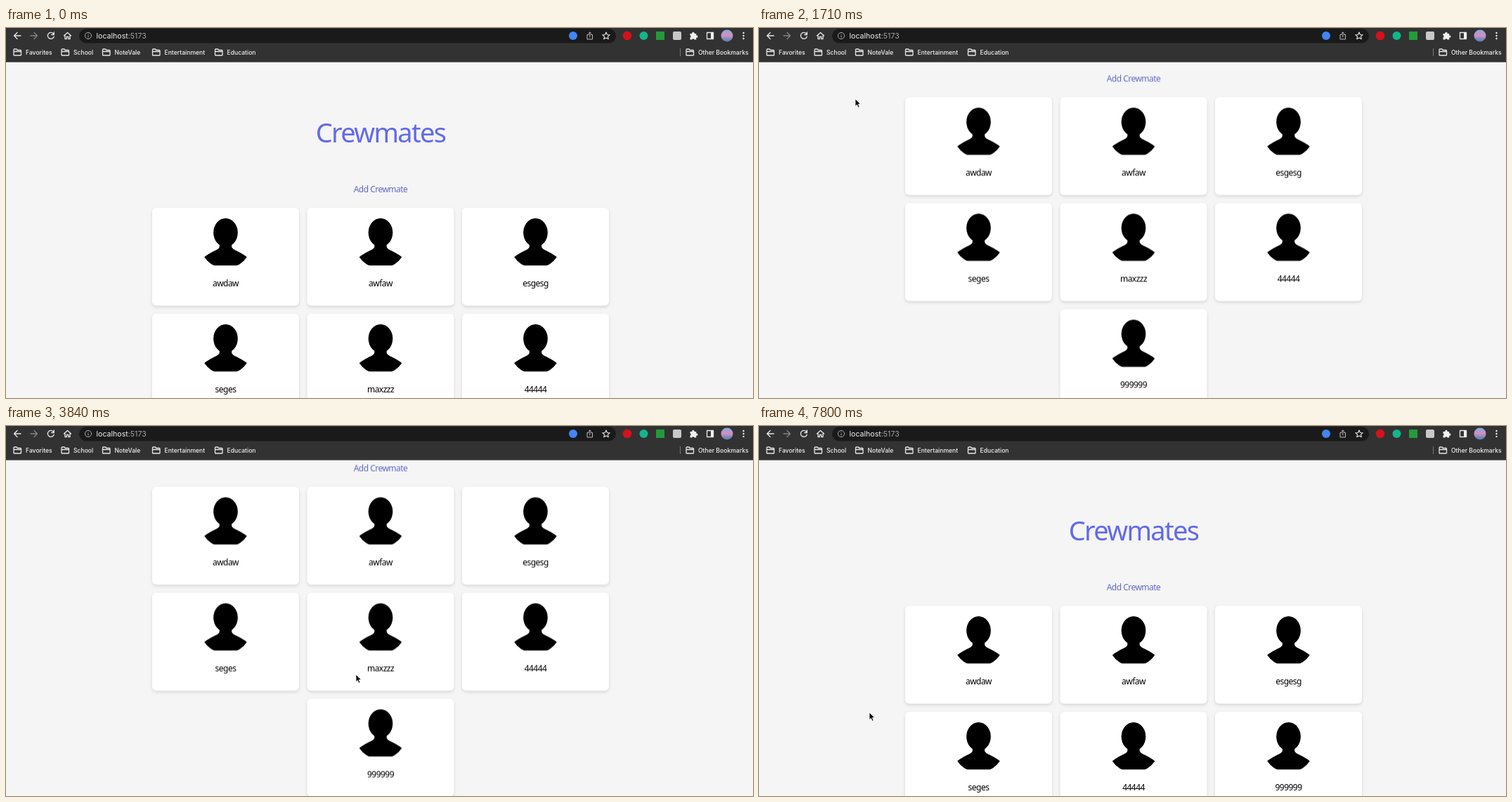
An HTML page for the animation above (8 s loop, 1063 by 527 pixels).

```html
<!DOCTYPE html>
<html lang="en">
<head>
<meta charset="utf-8">
<title>Crewmates</title>
<style>
html, body { margin: 0; width: 100%; height: 100%; overflow: hidden; background: #f5f5f5; }
svg { display: block; }
.page text { font: 12px "Noto Sans", sans-serif; letter-spacing: -.044em; text-anchor: middle; }
.page .title { font-size: 38px; fill: #626aeb; }
.page .link { fill: #6168c8; }
.page .on-dark { fill: #fff; }
.card { fill: #fff; filter: drop-shadow(0 2px 2px rgba(0, 0, 0, .13)); }
.chrome text { font: 500 8.6px Inter, sans-serif; fill: #f1f1f1; }
.chrome .url { font-size: 10.6px; font-weight: 400; }
.url .dim { fill: #a3a3a3; }
.icon { fill: none; stroke: #e8e8e8; stroke-width: 1.3; stroke-linejoin: round; stroke-linecap: round; }
.fill { fill: #f1f1f1; }

.crew, .bare, .detail, .after, .hover, .arrow, .hand { animation: 8s step-end infinite; }
.crew { animation-name: crew; }
.bare { animation-name: bare; }
.detail { animation-name: detail; }
.after { animation-name: after; }
.hover { animation-name: hover; }
.arrow { animation-name: arrow; }
.hand { animation-name: hand; }
.scroll { animation: scroll 8s linear infinite; }
.cursor { animation: cursor 8s linear infinite; }
.delete { animation: delete 8s linear infinite; }

@keyframes crew {
  0%, 13.125% { visibility: visible; }
  12.375%, 57.75%, 100% { visibility: hidden; }
}
@keyframes bare {
  0%, 13.125%, 88.5%, 100% { visibility: hidden; }
  12.375%, 86.25% { visibility: visible; }
}
@keyframes detail {
  0%, 86.25%, 100% { visibility: hidden; }
  57.75% { visibility: visible; }
}
@keyframes after {
  0% { visibility: hidden; }
  88.5%, 100% { visibility: visible; }
}
@keyframes hover {
  0%, 16.5%, 100% { visibility: hidden; }
  9.75% { visibility: visible; }
}
@keyframes arrow {
  0%, 96.75%, 100% { visibility: visible; }
  76.5% { visibility: hidden; }
}
@keyframes hand {
  0%, 96.75%, 100% { visibility: hidden; }
  76.5% { visibility: visible; }
}
@keyframes scroll {
  0%, 18.75% { transform: translateY(0); animation-timing-function: ease-in-out; }
  21.375% { transform: translateY(-157.5px); animation-timing-function: ease-out; }
  25.875% { transform: translateY(-181.5px); }
  27%, 46.2% { transform: translateY(-182.5px); }
  48%, 100% { transform: translateY(-169.5px); }
}
@keyframes cursor {
  0% { transform: translate(68px, -13px); animation-timing-function: ease-out; }
  6.375%, 9.75% { transform: translate(60px, 11px); }
  10.5%, 16% { transform: translate(60px, 12px); animation-timing-function: ease-in-out; }
  19.125%, 26% { transform: translate(137px, 101px); animation-timing-function: ease-in-out; }
  32.25% { transform: translate(421px, 393px); animation-timing-function: ease-out; }
  36% { transform: translate(494px, 418px); animation-timing-function: ease-in-out; }
  37.875%, 59% { transform: translate(498px, 354px); animation-timing-function: ease-in-out; }
  66%, 68.6% { transform: translate(519px, 460px); animation-timing-function: ease-in-out; }
  70.875%, 74.3% { transform: translate(176px, 295px); }
  75.4% { transform: translate(75px, 205px); }
  76.5% { transform: translate(140px, 457px); }
  77.25% { transform: translate(144px, 463px); animation-timing-function: ease-out; }
  81%, 96.4% { transform: translate(128px, 464px); animation-timing-function: ease-out; }
  97.5%, 100% { transform: translate(157px, 408px); }
}
@keyframes delete {
  0%, 76.4% { fill: #1a1a1a; stroke: #1a1a1a; }
  77.1%, 100% { fill: #2980b9; stroke: #5b73d8; }
}
</style>
</head>
<body>
<svg width="1063" height="527" viewBox="0 0 1063 527">
  <defs>
    <g id="person">
      <ellipse cy="30.5" rx="26" ry="30.5"/>
      <path d="M-13 48V60C-13 66 -22 68 -32 74C-44 81 -50.5 86 -50.5 93V101H50.5V93C50.5 86 44 81 32 74C22 68 13 66 13 60V48Z"/>
    </g>
    <path id="folder" class="icon" stroke-width="1" d="M.5 9V1.5Q.5 .5 1.5 .5H4.5L5.8 2H10Q11 2 11 3V9Q11 9.5 10.5 9.5H1Q.5 9.5 .5 9ZM.5 4H11"/>
    <clipPath id="round"><circle cx="104.5" cy="50" r="36.5"/></clipPath>
    <linearGradient id="photo" x2="0" y2="1">
      <stop offset=".1" stop-color="#8fa6d8"/>
      <stop offset=".5" stop-color="#d58fc0"/>
      <stop offset=".9" stop-color="#5a86b8"/>
    </linearGradient>
  </defs>

  <rect width="1063" height="527" fill="#f5f5f5"/>

  <g class="page">
    <g class="crew"><g class="scroll" id="before"></g></g>
    <g class="after" id="remaining"></g>
    <g class="bare">
      <text class="title" x="93" y="301">Crewmates</text>
      <text class="link" x="93" y="382">Add Crewmate</text>
    </g>
    <g class="detail">
      <text class="title" x="93" y="210">Crewmates</text>
      <use href="#person" x="93" y="273"/>
      <text x="93" y="409">Name: maxzzz</text>
      <text x="93" y="438">Favorite: burger</text>
      <rect x="33" y="455" width="50" height="30" rx="6" fill="#1a1a1a"/>
      <text class="on-dark" x="58" y="474.5">Edit</text>
      <rect class="delete" x="89.2" y="455.2" width="62.6" height="29.6" rx="6"/>
      <text class="on-dark" x="120.5" y="474.5">Delete</text>
    </g>
  </g>

  <g class="chrome">
    <rect width="1063" height="48.7" fill="#323232"/>
    <rect x="104" y="1" width="764" height="20.5" rx="10.2" fill="#1a1a1a"/>
    <circle class="hover" cx="64" cy="11" r="10" fill="#4a4a4a"/>
    <path class="icon" d="M21 11H11.5M16 6.5L11.5 11L16 15.500"/>
    <path class="icon" style="stroke:#858585" d="M35 11H44.500M40 6.500L44.500 11L40 15.500"/>
    <path class="icon" d="M67.300 8A4.500 4.500 0 1 0 68.200 12.200M68.300 6V9.500H64.800"/>
    <path class="icon" d="M82.500 11L87.500 6.500L92.500 11M84 10.500V15.500H86.300V12.500H88.700V15.500H91V10.500"/>
    <g class="icon" style="stroke:#a8a8a8;stroke-width:1">
      <circle cx="117" cy="11" r="4.600"/>
      <path d="M117 10.800V13.300M117 8.700V8.800"/>
    </g>
    <text class="url" x="128.500" y="15">localhost<tspan class="dim">:5173</tspan><tspan class="dim detail">/crewmate/12</tspan></text>

    <circle cx="807" cy="11" r="6" fill="#4285f4"/>
    <path class="icon" stroke-width="1" style="stroke:#bdbdbd;stroke-width:1" d="M829 9.500H827V16H834.500V9.500H832.500M830.750 13V6.200M828.700 8L830.750 6L832.800 8"/>
    <path class="icon" style="stroke-width:1.100" d="M854 6L855.500 9.500L859.200 9.800L856.400 12.200L857.300 15.800L854 13.900L850.700 15.800L851.600 12.200L848.800 9.800L852.500 9.500Z"/>
    <circle cx="884" cy="11" r="6.300" fill="#d4121b"/>
    <circle cx="907.500" cy="11" r="6" fill="#15b58c"/>
    <rect x="925" y="5" width="12" height="12" fill="#239a3b"/>
    <rect x="949" y="5" width="12" height="12" rx="2" fill="#c8c8c8"/>
    <path class="fill" d="M973.500 8H976.300A1.700 1.700 0 1 1 979.500 8H982.200V10.500A1.700 1.700 0 1 1 982.200 13.700V16.500H979.500A1.700 1.700 0 0 0 976.300 16.500H973.500V13.700A1.700 1.700 0 0 0 973.500 10.500Z"/>
    <rect class="icon" x="997.500" y="6.500" width="9" height="9"/>
    <rect class="fill" x="1003" y="6.500" width="4" height="9"/>
    <circle cx="1026" cy="11" r="8.500" fill="url(#photo)"/>
    <g class="fill">
      <circle cx="1049.500" cy="7" r="1.200"/>
      <circle cx="1049.500" cy="11" r="1.200"/>
      <circle cx="1049.500" cy="15" r="1.200"/>
    </g>
    <g id="bookmarks"></g>
    <path d="M959.500 29V40" stroke="#777"/>
  </g>

  <g class="cursor">
    <path class="arrow" d="M0 0V10.500L2.400 8.300L4.100 12.300L6 11.500L4.300 7.600H7.600Z" stroke="#fff" stroke-width=".8"/>
    <path class="hand" d="M-1 .8Q0 -.6 1.200 .8L2 4L6 5.200Q7.300 5.800 7 8L6 12.300H.4L-3.800 7.500Q-4 6 -2.500 6.300L-.2 8Z" fill="#fff" stroke="#000" stroke-width=".9" stroke-linejoin="round"/>
  </g>
</svg>
<script>
const fill = (id, markup) => { document.getElementById(id).innerHTML = markup; };

const card = (name, i) => {
  const column = i === 6 ? 1 : i % 3;
  const row = Math.floor(i / 3);
  return `<g transform="translate(${208 + 220.5 * column} ${256 + 151 * row})">
    <rect class="card" width="209" height="139.500" rx="6"/>
    <g clip-path="url(#round)"><use href="#person" transform="translate(104.500 15) scale(.667)"/></g>
    <text x="104.500" y="111.500">${name}</text>
  </g>`;
};

const list = names => `<text class="title" x="533" y="162.500">Crewmates</text>
  <text class="link" x="533" y="234">Add Crewmate</text>${names.map(card).join("")}`;

const bookmark = ([label, x]) =>
  `<use href="#folder" x="${x}" y="29.500"/><text x="${x + 17.5}" y="38">${label}</text>`;

const crew = ["awdaw", "awfaw", "esgesg", "seges", "maxzzz", "44444", "999999"];
fill("before", list(crew));
fill("remaining", list(crew.filter(name => name !== "maxzzz")));
fill("bookmarks", [
  ["Favorites", 10.5], ["School", 78.5], ["NoteVale", 137], ["Entertainment", 208],
  ["Education", 297], ["Other Bookmarks", 967.5]
].map(bookmark).join(""));
</script>
</body>
</html>
```
